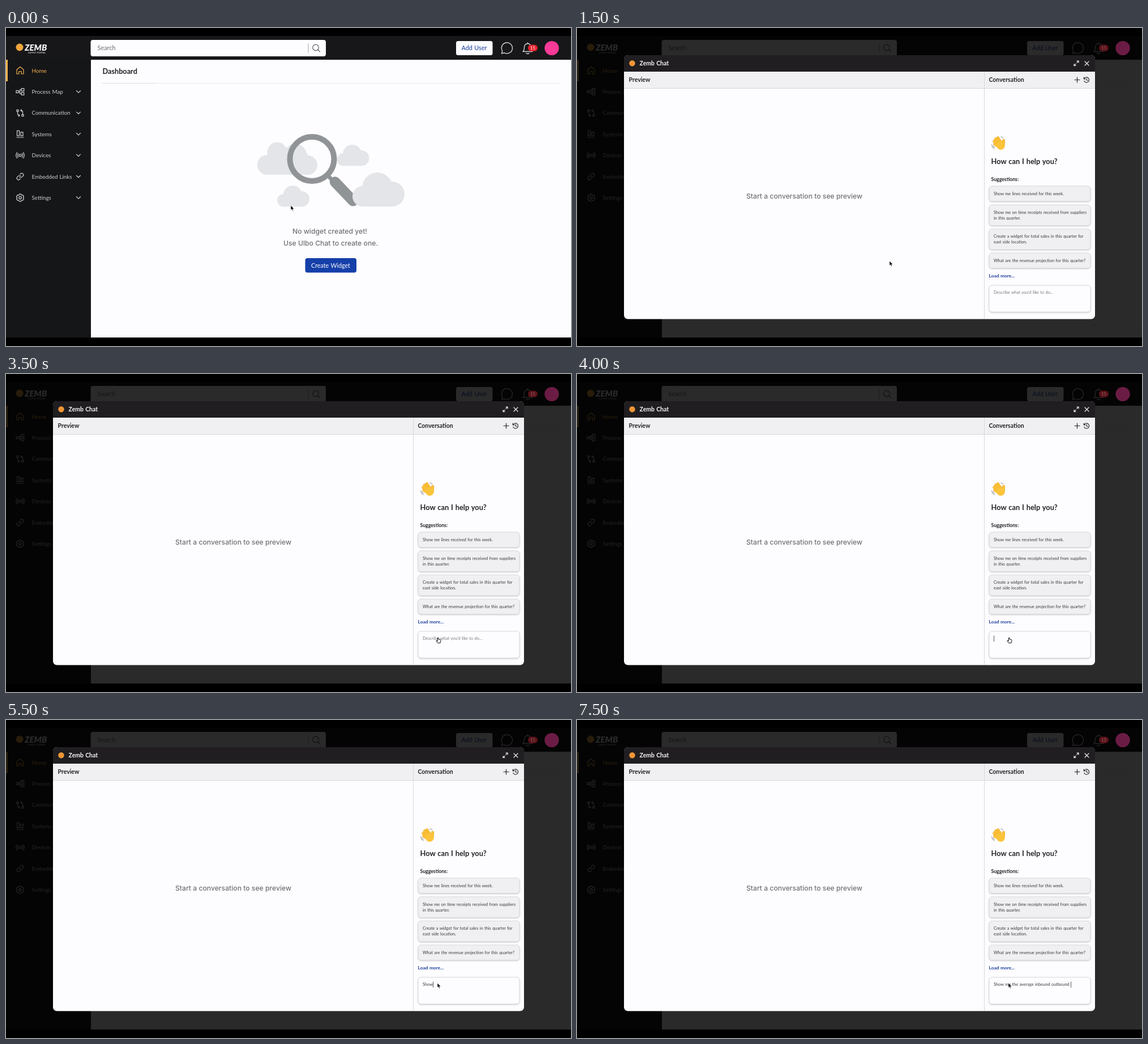
Write an HTML page that moves like this. It is 998x561 px and loops after 8000 ms.

```html
<!DOCTYPE html>
<html lang="en">
<head>
<meta charset="utf-8">
<title>Dashboard chat</title>
<style>
html, body { margin: 0; width: 100%; height: 100%; overflow: hidden; background: #000; }
svg { display: block; }
text { font-family: Lato, sans-serif; word-spacing: .06em; white-space: pre; }
.b { font-weight: 700; }
.inter { font: 500 12.2px Inter, sans-serif; word-spacing: 0; fill: #717174; text-anchor: middle; }
.line { fill: none; stroke: #d2d2d4; stroke-width: 1.2; stroke-linecap: round; stroke-linejoin: round; }
.dark { stroke: #252427; }
.nav { font-size: 9.8px; fill: #cdcdcf; }
.small { font-size: 7.4px; fill: #3b3a3d; }
.cloud { fill: #e3e5e8; }
.card { fill: #f0eff1; stroke: #d8d7da; stroke-width: .9; filter: drop-shadow(0 1px .8px #0003); }
</style>
</head>
<body>
<svg width="998" height="561" viewBox="0 0 998 561">
  <defs>
    <g id="cloud">
      <circle cx="18" cy="42" r="18"/><circle cx="44" cy="27" r="27"/>
      <circle cx="70" cy="38" r="22"/><rect x="17" y="38" width="54" height="22"/>
    </g>
  </defs>

  <!-- page -->
  <rect y="14" width="998" height="532" fill="#17171a"/>
  <rect y="56" width="150" height="490" fill="#151618"/>
  <rect x="150" y="56" width="848" height="490" fill="#fdfcfe"/>
  <rect y="56" width="3" height="38" fill="#f6b24e"/>

  <circle cx="24" cy="34" r="6.5" fill="#f0a63c"/>
  <text x="33" y="40" font-size="15" font-weight="900" font-style="italic" fill="#f2f2f2">ZEMB</text>
  <text x="39" y="44.5" font-size="4.3" font-weight="700" font-style="italic" fill="#c8c8c8">SUPPLY PORTAL</text>

  <rect x="149.5" y="21" width="415.5" height="29" rx="4" fill="#fdfcfe"/>
  <text x="161.5" y="39" font-size="10.9" fill="#6d6d70">Search</text>
  <path d="M534 27V44" stroke="#a9a9ac"/>
  <g class="line" style="stroke:#626266"><circle cx="547" cy="34.5" r="5.3"/><path d="M551 38.5L554.5 42"/></g>

  <rect x="795" y="23" width="64.5" height="25" rx="3.5" fill="#fdfcfe"/>
  <text x="827" y="39" font-size="10.9" fill="#1a3fa2" text-anchor="middle">Add User</text>
  <g class="line" style="stroke-width:1.4">
    <path d="M875.5 45L876.8 40.5A9.6 9.6 0 1 1 880.3 43.8Z"/>
    <path d="M913 41.5H930C928 39.5 927.5 37 927.5 33.5A6 6 0 0 0 915.500 33.500C915.500 37 915 39.500 913 41.500ZM919 44.500Q921.500 46.500 924 44.500M921.500 27.500V25.800"/>
  </g>
  <rect x="922" y="29.500" width="17" height="11.500" rx="5.700" fill="#e3232c"/>
  <text x="930.500" y="38" font-size="7.800" fill="#fff" text-anchor="middle">15</text>
  <circle cx="964" cy="35.500" r="12.600" fill="#fa3a97"/>

  <g id="nav"></g>

  <text class="b" x="170.500" y="80.500" font-size="12.700" fill="#202023">Dashboard</text>
  <path d="M170 97.500H977" stroke="#e9e8eb"/><path d="M170 97.500H265" stroke="#dcdbde"/>

  <g class="cloud">
    <circle cx="461" cy="241.500" r="17.200"/><circle cx="479" cy="219" r="17.500"/>
    <circle cx="511" cy="225" r="20.500"/><circle cx="533" cy="242" r="17"/>
    <rect x="461" y="222" width="72" height="36.800"/>
    <use href="#cloud" transform="translate(479 278) scale(.62)"/>
    <use href="#cloud" transform="translate(584.500 206) scale(.62)"/>
  </g>
  <g fill="none" stroke="#909497">
    <circle cx="540.500" cy="231" r="39" stroke-width="10"/>
    <path d="M567 259L581 273" stroke-width="7"/>
    <path d="M581 271.500L613 305" stroke-width="18.500" stroke-linecap="round"/>
  </g>
  <use class="cloud" href="#cloud" x="612" y="255"/>

  <text class="inter" x="572" y="363">No widget created yet!</text>
  <text class="inter" x="573.500" y="384">Use Ulbo Chat to create one.</text>
  <rect x="528.500" y="406" width="90.500" height="25.500" rx="4" fill="#153fa9"/>
  <text x="573.500" y="422.700" font-size="10.700" fill="#fff" text-anchor="middle">Create Widget</text>

  <!-- chat window -->
  <g id="modal">
    <rect width="998" height="561" opacity=".83"/>
    <circle cx="964" cy="35.500" r="12.600" fill="#6b1c45"/>
    <rect x="922" y="29.500" width="17" height="11.500" rx="5.700" fill="#5a1118"/>
    <text x="930.500" y="38" font-size="7.800" fill="#8a6a6c" text-anchor="middle">15</text>

    <rect x="83" y="48" width="832" height="465.500" rx="7" fill="#fdfcfe"/>
    <path d="M83 77V55Q83 48 90 48H908Q915 48 915 55V77Z" fill="#201e21"/>
    <circle cx="97.500" cy="62.300" r="5.200" fill="#ee9636"/>
    <text class="b" x="110.500" y="66" font-size="10.500" fill="#f6f6f6">Zemb Chat</text>
    <g class="line" style="stroke:#ececee">
      <path d="M883 61L886 58M883 58H886V61M881 63.500L878 66.500M878 63.500V66.500H881M897 59L904 66M904 59L897 66"/>
    </g>
    <rect x="83" y="77" width="832" height="29.500" fill="#f0eff1"/>
    <path d="M83 106.500H915M719.500 77V513" stroke="#d8d7da"/>
    <g class="b" font-size="10.500" fill="#232225">
      <text x="91.500" y="95">Preview</text><text x="727.500" y="95">Conversation</text>
    </g>
    <g class="line dark">
      <path d="M879 91.500H888M883.500 87V96"/>
      <path d="M895.800 89.500A4.600 4.600 0 1 1 895.800 93.500M895.300 87V89.800H898M900.200 89V91.800L902 92.800"/>
      <path d="M887.200 481L897.500 486.200L887.200 491.500L889 486.200ZM889 486.200H893"/>
    </g>
    <text class="inter" x="401.500" y="300.700">Start a conversation to see preview</text>

    <g id="wave" fill="none" stroke-linecap="round"></g>
    <g class="b" fill="#232225">
      <text x="731.500" y="240.300" font-size="12.800">How can I help you?</text>
      <text x="731.500" y="269.800" font-size="8.700">Suggestions:</text>
      <text x="727.500" y="440" font-size="8.400" fill="#1c3f9e">Load more...</text>
    </g>
    <g id="cards"></g>
    <rect class="card" x="728" y="454" width="179" height="47" rx="5" style="fill:#fdfcfe"/>
    <text id="input" class="small" x="736" y="469.200"></text>
    <rect id="caret" y="461.500" width=".8" height="10.500" fill="#333"/>
  </g>

  <!-- pointer -->
  <g id="ring" fill="none">
    <circle cx="552" cy="412" r="15.300" stroke="#fff" stroke-width="4"/>
    <circle cx="552" cy="412" r="15.300" stroke="#111" stroke-width="2"/>
  </g>
  <path id="arrow" d="M0 0V8.200L1.900 6.500L3.200 9.400L4.600 8.800L3.300 6H5.900Z" fill="#000" stroke="#fff" stroke-width=".6"/>
  <path id="hand" d="M-1.500 0V-4Q-.700 -5.300 0 -4V-1.500L3 -1Q4.200 -.600 4 1L3 5H-1.500L-4 1.500Q-4 0 -2.800 .500L-1.500 1.800Z" fill="#fff" stroke="#111" stroke-width="1"/>
</svg>
<script>
const $ = id => document.getElementById(id);

const NAV = [
  ["Home", "M-6 -1.500L0 -6.500L6 -1.500V6H2.200V1.500H-2.200V6H-6Z"],
  ["Process Map", "M-7 -2h4v4h-4ZM2.300 -5.800h4.500v4.500h-4.500ZM2.300 1.300h4.500v4.500h-4.500ZM-3 0H-.500M2.300 -3.500H-.500V3.500H2.300"],
  ["Communication", "M-6 -5.500h3v3h-3ZM3 2.800h3v3h-3ZM-4.500 -2.500V2Q-4.500 4.500 -1 4.500M-2.500 2.800L-.800 4.500L-2.500 6.200M4.500 2.800V-2Q4.500 -4.500 1 -4.500M2.500 -6.200L.800 -4.500L2.500 -2.800"],
  ["Systems", "M-5.500 -6h4v9h-4ZM1 -3.500h4v6.500h-4ZM-6 5.800H6"],
  ["Devices", "M-2 0a2 2 0 1 0 4 0a2 2 0 1 0 -4 0M-3.300 -3.300Q-5.800 0 -3.300 3.300M3.300 -3.300Q5.800 0 3.300 3.300M-5.500 -5Q-9 0 -5.500 5M5.500 -5Q9 0 5.500 5"],
  ["Embedded Links", "M-1.200 .600a2.900 2.900 0 0 0 4.400 .300l1.800 -1.800a2.900 2.900 0 0 0 -4.100 -4.100l-1 1M1.200 -.600a2.900 2.900 0 0 0 -4.400 -.300l-1.800 1.800a2.900 2.900 0 0 0 4.100 4.100l1 -1"],
  ["Settings", "M-2.200 0a2.200 2.200 0 1 0 4.400 0a2.200 2.200 0 1 0 -4.400 0M-1.500 -6.500H1.500L2.200 -4.600L4.600 -4.800L6.500 -2L5.300 0L6.500 2L4.600 4.800L2.200 4.600L1.500 6.500H-1.500L-2.200 4.600L-4.600 4.800L-6.500 2L-5.300 0L-6.500 -2L-4.600 -4.800L-2.200 -4.600Z"]
];
$("nav").innerHTML = NAV.map(([label, icon], i) => {
  const tint = i ? "" : "#f6b24e";
  return `<g transform="translate(25 ${75 + i * 37.4})">
    <path class="line" style="stroke:${tint}" d="${icon}"/>
    <text class="nav" style="fill:${tint}" x="20.500" y="3.600">${label}</text>
    ${i ? '<path class="line" d="M99.500 -1.700L103 1.700L106.500 -1.700"/>' : ""}</g>`;
}).join("");

const CARDS = [
  [279, "Show me lines received for this week."],
  [312, "Show me on time receipts received from suppliers", "in this quarter."],
  [354.5, "Create a widget for total sales in this quarter for", "east side location."],
  [397, "What are the revenue projection for this quarter?"]
];
$("cards").innerHTML = CARDS.map(([y, ...lines]) =>
  `<rect class="card" x="728" y="${y}" width="179" height="${17 + lines.length * 9.7}" rx="5"/>` +
  lines.map((s, i) => `<text class="small" x="736" y="${y + 15.7 + i * 10}">${s}</text>`).join("")
).join("");

// waving hand: fingers, thumb and palm, each with a darker edge
const finger = d => `<path d="${d}" stroke="#e59a1c" stroke-width="5.200"/><path d="${d}" stroke="#fcc43a" stroke-width="4.200"/>`;
$("wave").innerHTML =
  ["M753 207L753.500 198.500", "M750 204L743.500 194", "M749 205L739.500 196", "M748 207L737 200", "M747 210L738 205"].map(finger).join("") +
  '<circle cx="748.500" cy="207.500" r="7.300" fill="#fcc43a"/>' +
  '<path d="M732.500 206Q733 211 737 213M735 208Q735.500 210 737.500 211M749 192Q752 192.500 753 194" stroke="#77777c" stroke-width=".9"/>';

const STEP = 500, LOOP = 8000;
const PROMPT = "Show me the average inbound outbound ";
const TYPED = { 11: 4, 12: 10, 13: 15, 14: 26, 15: 37 };

// pointer position and shape, each valid from its step onward
const POINTER = [
  [0, 503, 313, "arrow"], [1, 553, 417, "hand"], [3, 552, 411, "arrow"],
  [5, 707, 434, "arrow"], [6, 764, 469.5, "hand"], [11, 762, 464, "arrow"]
];
const show = (id, on) => $(id).style.display = on ? "" : "none";

function draw(step) {
  const [, x, y, shape] = POINTER.findLast(p => p[0] <= step);
  for (const id of ["arrow", "hand"]) show(id, id === shape);
  $(shape).setAttribute("transform", `translate(${x} ${y})`);
  show("ring", step === 2);
  show("modal", step >= 3);

  const focused = step >= 8, input = $("input");
  input.textContent = focused ? PROMPT.slice(0, TYPED[step] || 0) : "Describe what you'd like to do...";
  input.style.fill = focused ? "" : "#7b7a7e";
  show("caret", focused && step !== 9);
  $("caret").setAttribute("x", 736 + (focused ? input.getComputedTextLength() : 0));
}

function tick() {
  draw(Math.floor(performance.now() % LOOP / STEP));
  requestAnimationFrame(tick);
}
tick();
</script>
</body>
</html>
```
